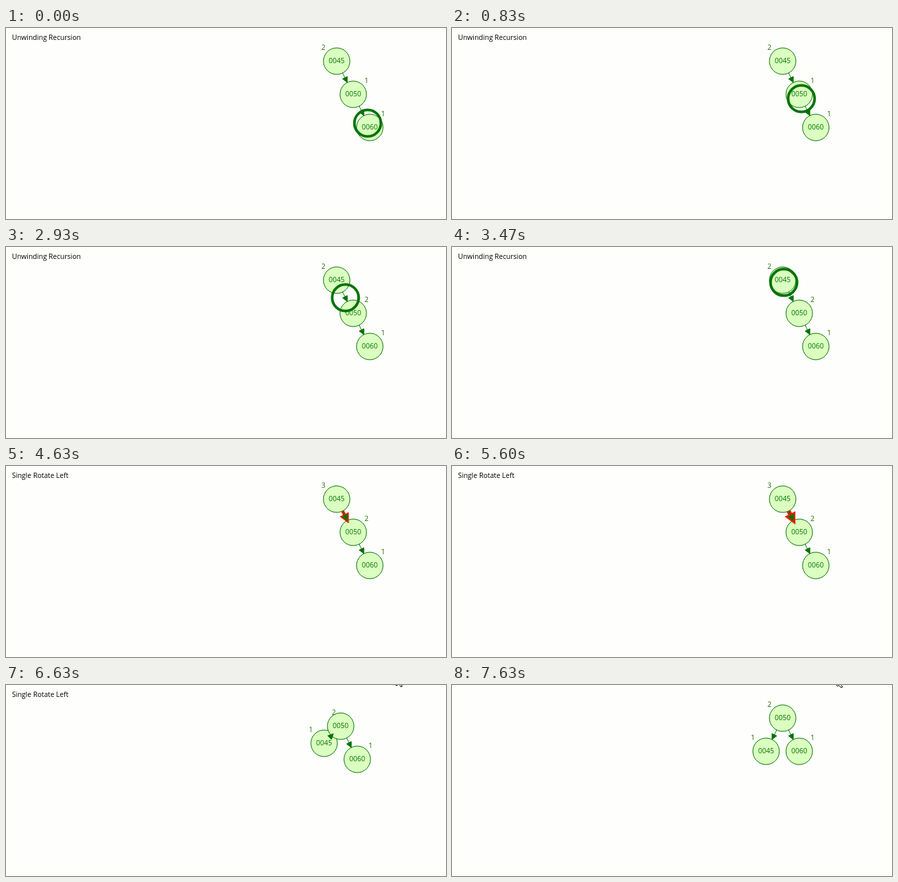
An HTML page with a canvas for the animation above (7.71 s loop, 664x288 px).

```html
<!DOCTYPE html>
<html lang="en">
<head>
<meta charset="utf-8">
<title>AVL tree: single left rotation</title>
<style>
html, body { margin: 0; width: 100%; height: 100%; overflow: hidden; background: #fefefc; }
canvas { display: block; width: 664px; height: 288px; }
</style>
</head>
<body>
<canvas id="stage" width="664" height="288"></canvas>
<script>
const ctx = document.getElementById('stage').getContext('2d');
const LOOP = 7710, R = 20;
const PAPER = '#fefefc', GREEN = '#007300', LABEL = '#1f6d00', RED = '#dc2200', FILL = '#dbffc0';

// Start of each step
const ADJUST_50 = 1100, CLIMB_45 = 2315, ADJUST_45 = 3620,
      MARK_EDGE = 4625, ROTATE = 5715, DONE = 6980;

const lerp = (a, b, p) => a + (b - a) * p;

// Gentle ease: half linear, half cosine
function progress(t, start, length) {
  const u = Math.min(1, Math.max(0, (t - start) / length));
  return u / 2 + (1 - Math.cos(Math.PI * u)) / 4;
}

function text(str, x, y, color, align = 'center') {
  ctx.font = '10.5px "Open Sans", "Noto Sans", sans-serif';
  ctx.textAlign = align;
  ctx.fillStyle = color;
  ctx.fillText(str, x, y + 3);
}

function circle(x, y, color, width, fill) {
  ctx.beginPath();
  ctx.arc(x, y, R, 0, Math.PI * 2);
  if (fill) {
    ctx.fillStyle = fill;
    ctx.fill();
  }
  ctx.strokeStyle = color;
  ctx.lineWidth = width;
  ctx.stroke();
}

// Point on the rim of a that faces b
function rim(a, b) {
  const dx = b.x - a.x, dy = b.y - a.y, len = Math.hypot(dx, dy) || 1;
  return { x: a.x + dx / len * R, y: a.y + dy / len * R };
}

function arrow(a, b, color, width) {
  const from = rim(a, b), to = rim(b, a);
  const dx = from.x - to.x, dy = from.y - to.y, len = Math.hypot(dx, dy) || 1;
  const ux = dx / len, uy = dy / len;
  ctx.strokeStyle = ctx.fillStyle = color;
  ctx.lineWidth = width;
  ctx.beginPath();
  ctx.moveTo(from.x, from.y);
  ctx.lineTo(to.x, to.y);
  ctx.stroke();
  ctx.beginPath();
  ctx.moveTo(to.x, to.y);
  ctx.lineTo(to.x + ux * 8 - uy * 4, to.y + uy * 8 + ux * 4);
  ctx.lineTo(to.x + ux * 8 + uy * 4, to.y + uy * 8 - ux * 4);
  ctx.closePath();
  ctx.stroke();
  ctx.fill();
}

function ring(a, b, p) {
  circle(lerp(a.x, b.x, p), lerp(a.y, b.y, p), GREEN, 4);
}

function message(t) {
  if (t < ADJUST_50) return 'Unwinding Recursion';
  if (t < CLIMB_45) return 'Adjusting height after recursive call';
  if (t < ADJUST_45) return 'Unwinding Recursion';
  if (t < MARK_EDGE) return 'Adjusting height after recursive call';
  return t < DONE ? 'Single Rotate Left' : '';
}

// Tail of the mouse pointer peeking in at the top edge
function pointer(t) {
  if (t < 6500) return;
  ctx.strokeStyle = '#000';
  ctx.lineWidth = 1;
  ctx.beginPath();
  if (t < 6900) {
    ctx.moveTo(588, 0.5);
    ctx.lineTo(591, 0.5);
    ctx.moveTo(594.5, 0);
    ctx.lineTo(595.5, 2.5);
    ctx.lineTo(597.5, 2.5);
    ctx.lineTo(597.5, 0);
  } else {
    ctx.moveTo(580, 0);
    ctx.lineTo(582, 2);
    ctx.lineTo(584, 0.5);
    ctx.lineTo(587, 4);
    ctx.lineTo(589.5, 3);
    ctx.lineTo(587, 0);
  }
  ctx.stroke();
}

function draw(t) {
  ctx.fillStyle = PAPER;
  ctx.fillRect(0, 0, 664, 288);

  const p = progress(t, ROTATE, 1290);
  const a = { key: '0045', x: lerp(499, 474, p), y: lerp(50, 100, p), side: -20,
              height: t < ADJUST_45 ? 2 : t < ROTATE ? 3 : 1,
              hot: t >= ADJUST_45 && t < MARK_EDGE };
  const b = { key: '0050', x: lerp(524, 499, p), y: lerp(100, 50, p), side: lerp(20, -20, p),
              height: t < ADJUST_50 ? 1 : 2,
              hot: t >= ADJUST_50 && t < CLIMB_45 };
  const c = { key: '0060', x: lerp(549, 524, p), y: lerp(150, 100, p), side: 20, height: 1 };

  text(message(t), 9, 15, '#000', 'left');
  for (const n of [a, b, c]) {
    circle(n.x, n.y, GREEN, 1, FILL);
    text(n.key, n.x, n.y, GREEN);
  }
  for (const n of [a, b, c])
    text(n.height, n.x + n.side, n.y - 20, n.hot ? RED : LABEL);

  if (t < ADJUST_50) ring(c, b, progress(t, -235, 1300));
  else if (t >= CLIMB_45 && t < ADJUST_45) ring(b, a, progress(t, CLIMB_45 - 5, 1300));

  if (t < ROTATE) {
    if (t >= MARK_EDGE) arrow(a, b, RED, 4.6 + (t - MARK_EDGE) / 600);
    arrow(a, b, GREEN, 1);
  } else {
    arrow(b, a, GREEN, 1);
  }
  arrow(b, c, GREEN, 1);
  pointer(t);
}

const begin = performance.now();
function tick() {
  draw((performance.now() - begin) % LOOP);
  requestAnimationFrame(tick);
}
tick();
</script>
</body>
</html>
```
